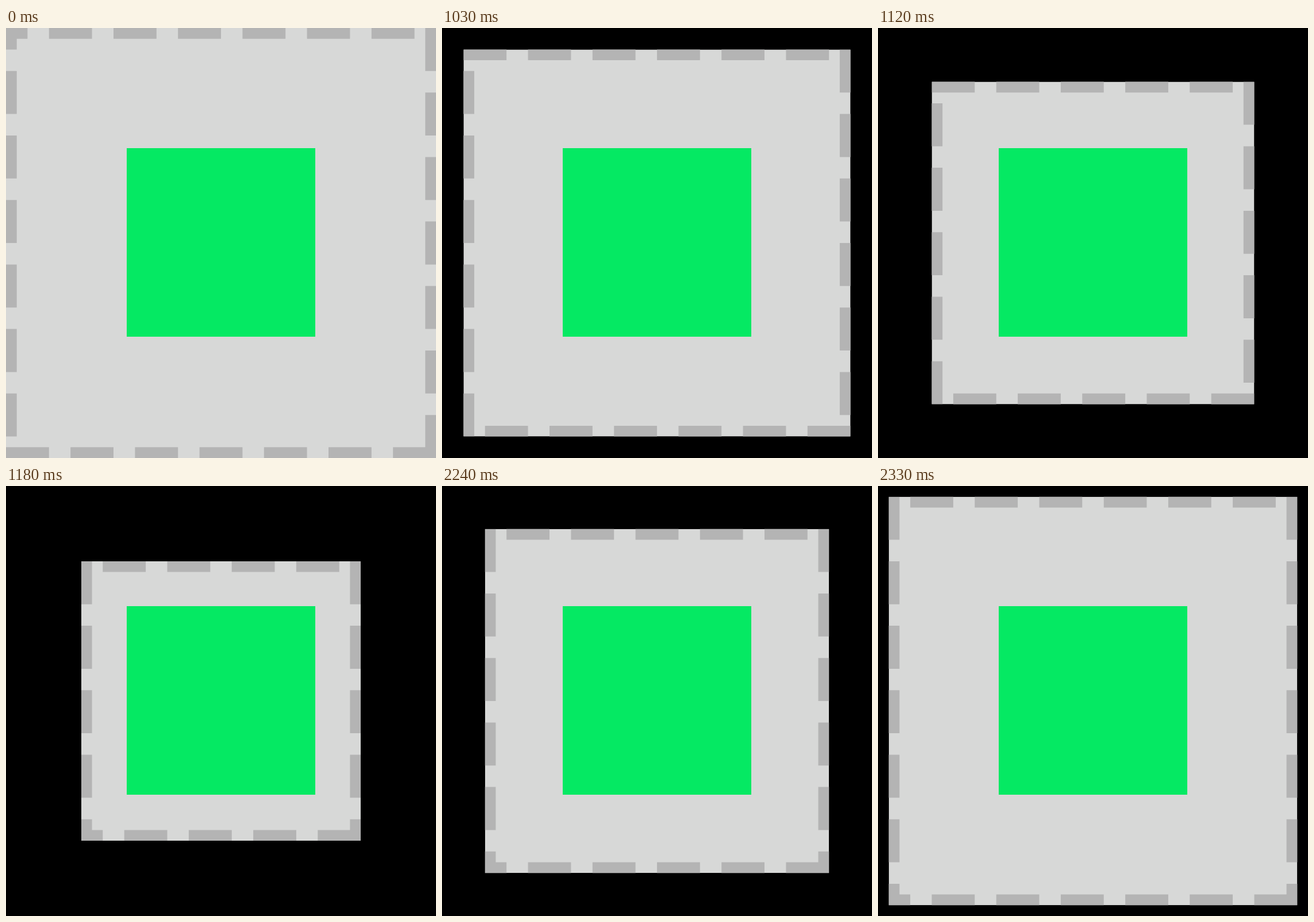
Animation of 748x748 px, one loop 2.36 s. Source, as an HTML page:

```html
<!DOCTYPE html>
<html lang="en">
<head>
<meta charset="utf-8">
<title>Shrinking dashed frame</title>
<style>
  html, body { margin: 0; width: 100%; height: 100%; overflow: hidden; background: #000; }
  svg { display: block; }
</style>
</head>
<body>
<svg width="100%" height="100%" viewBox="0 0 748 748">
  <rect id="backdrop" width="748" height="748"/>
  <!-- The nested viewport clips away the outer half of the dashed stroke. -->
  <svg id="panel" overflow="hidden">
    <rect width="100%" height="100%" fill="#d7d8d7"/>
    <path id="dashes" fill="none" stroke="#b4b4b4" stroke-width="2" stroke-dasharray="4 2"/>
  </svg>
  <rect x="210" y="209" width="328" height="328" fill="#05e963"/>
</svg>
<script>
  const LOOP = 2360, STEP = 30, SHRINK_AT = 1000, GROW_AT = 2180;
  const CELLS = 40, UNIT = 748 / CELLS, MAX_INSET = 7;
  const [backdrop, panel, dashes] =
    ["backdrop", "panel", "dashes"].map(id => document.getElementById(id));

  const stepsSince = (start, time) => Math.floor((time - start) / STEP) + 1;

  function insetAt(time) {
    if (time < SHRINK_AT) return 0;
    if (time < GROW_AT) return Math.min(MAX_INSET, stepsSince(SHRINK_AT, time));
    return MAX_INSET - stepsSince(GROW_AT, time);
  }

  function setAttributes(element, attributes) {
    for (const name in attributes) element.setAttribute(name, attributes[name]);
  }

  function draw(time) {
    const inset = insetAt(time);
    const size = CELLS - 2 * inset;
    const flash = time >= SHRINK_AT && time < SHRINK_AT + STEP;
    setAttributes(backdrop, { fill: flash ? "#f0008c" : "#000" });
    setAttributes(panel, {
      x: inset * UNIT, y: inset * UNIT,
      width: size * UNIT, height: size * UNIT,
      viewBox: `0 0 ${size} ${size}`
    });
    // Clockwise from the bottom right corner, so the dashes shift as the side shrinks.
    setAttributes(dashes, { d: `M${size} ${size}H0V0H${size}V${size}` });
  }

  const start = performance.now();
  function tick() {
    draw((performance.now() - start) % LOOP);
    requestAnimationFrame(tick);
  }
  tick();
</script>
</body>
</html>
```
